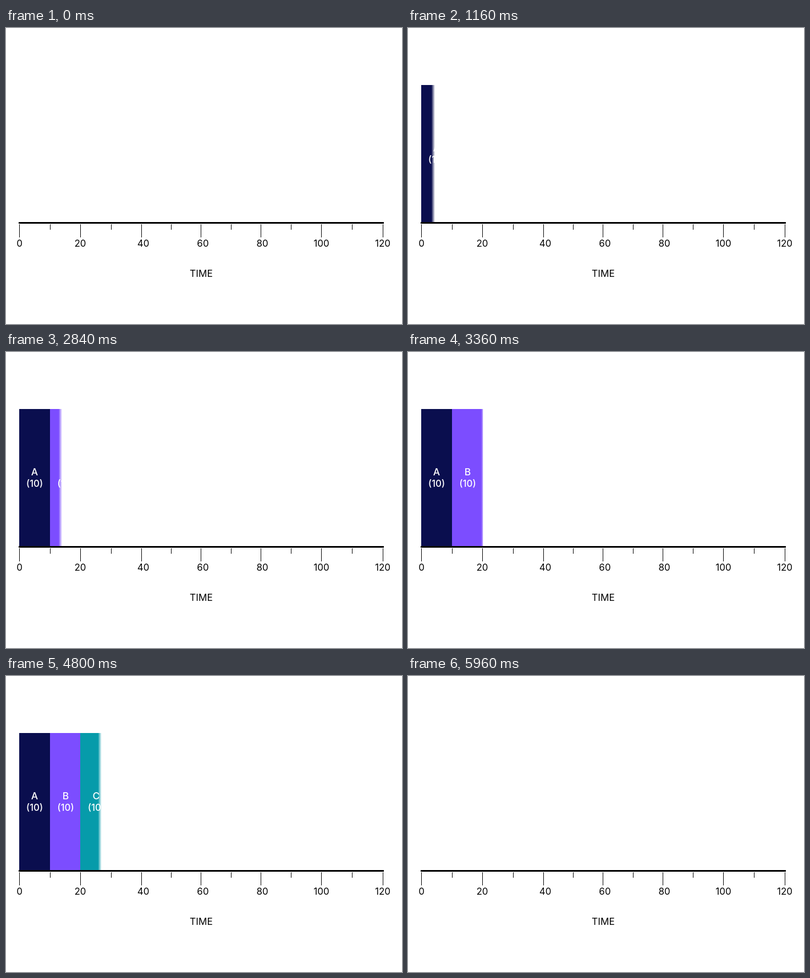
An HTML page with a canvas that plays this animation: 720x540 px, repeating every 6000 ms.

```html
<!DOCTYPE html>
<html lang="en">
<head>
<meta charset="utf-8">
<title>Timeline</title>
<style>
  html, body { margin: 0; width: 100%; height: 100%; overflow: hidden; background: #fff; }
  canvas { display: block; }
</style>
</head>
<body>
<canvas id="stage" width="720" height="540"></canvas>
<script>
const ctx = document.getElementById('stage').getContext('2d');

const LOOP = 6000, STEP = 40, CLEAR_AT = 5960;
const WIPE_SPEED = 0.0717; // pixels per millisecond
const SOFT_EDGE = 6.5;

const bars = [
  { name: 'A', rgb: '10,14,78',   left: 24,  right: 81,    center: 52,    start: 811 },
  { name: 'B', rgb: '124,77,255', left: 80,  right: 136.3, center: 108.5, start: 2530 },
  { name: 'C', rgb: '6,155,170',  left: 135, right: 192,   center: 164,   start: 4259 }
];
const majorTicks = [24, 135, 246, 354, 463, 573, 685];
const minorTicks = [80, 191, 300, 409, 518, 629];
const labelCenters = [24.5, 135, 249.5, 358, 466, 573.5, 685];

function write(text, x, y, color, weight = 400, size = 17) {
  ctx.font = `${weight} ${size}px Inter, sans-serif`;
  ctx.textAlign = 'center';
  ctx.fillStyle = color;
  ctx.fillText(text, x, y);
}

function drawAxis() {
  ctx.fillStyle = '#000';
  ctx.fillRect(23, 354, 664, 3);
  majorTicks.forEach(x => ctx.fillRect(x, 358, 1, 24));
  minorTicks.forEach(x => ctx.fillRect(x, 358, 1, 10));
  labelCenters.forEach((x, i) => write(i * 20, x, 398.5, '#000'));
  write('TIME', 355, 454, '#000', 400, 17.3);
}

function drawBar({ name, rgb, left, right, center, start }, time) {
  if (time < start) return;
  const edge = left + (time - start) * WIPE_SPEED;
  const fill = ctx.createLinearGradient(edge - SOFT_EDGE, 0, edge, 0);
  fill.addColorStop(0, `rgb(${rgb})`);
  fill.addColorStop(1, `rgba(${rgb},0)`);
  ctx.fillStyle = fill;
  ctx.fillRect(left, 104, right - left, 250);
  // White text stays invisible until the bar is behind it.
  write(name, center, 224.5, '#fff', 500, 17.5);
  write('(10)', center, 245.5, '#fff', 500, 17);
}

function draw(now) {
  const time = Math.floor((now % LOOP) / STEP) * STEP;
  ctx.fillStyle = '#fff';
  ctx.fillRect(0, 0, 720, 540);
  if (time < CLEAR_AT) bars.forEach(bar => drawBar(bar, time));
  drawAxis();
}

let origin;
function tick(now) {
  origin ??= now;
  draw(now - origin);
  requestAnimationFrame(tick);
}
requestAnimationFrame(tick);
</script>
</body>
</html>
```
